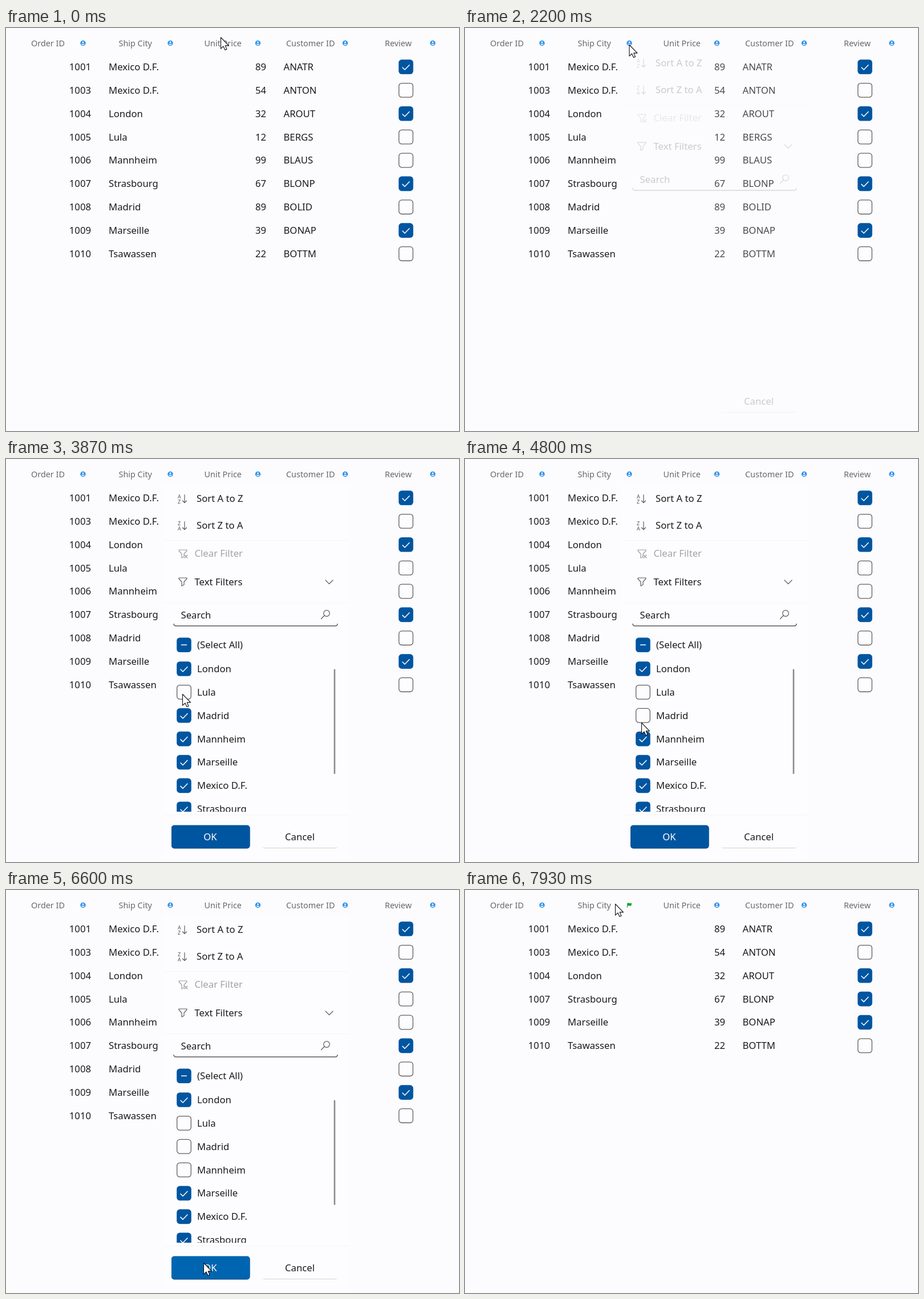
Recreate the animation shown at these times as an HTML page. Size 794 px wide and 705 px high, loop 8 s.

```html
<!DOCTYPE html>
<html lang="en">
<head>
<meta charset="utf-8">
<title>Grid filter</title>
<style>
  html, body { margin: 0; width: 100%; height: 100%; overflow: hidden; background: #fcfcff; }
  svg { display: block; font: 16.7px "Noto Sans", "Open Sans", sans-serif; fill: #1a1a1a; }
  .head { font-size: 14.4px; fill: #686868; }
  .end { text-anchor: end; }
  .mid { text-anchor: middle; }
  .dim { fill: #a2a2a2; }
  .line { fill: none; stroke: #5c5c5c; stroke-width: 1.2; stroke-linecap: round; stroke-linejoin: round; }
  .mark { fill: none; stroke: #fff; stroke-width: 1.5; stroke-linecap: round; stroke-linejoin: round; }
  .blue { fill: #0055a0; }
  .hover { fill: #0065b0; }
  .empty { fill: #fdfdff; stroke: #606060; stroke-width: 1.3; }
  .rule { stroke: #f5f5f3; }
  .sort { font-size: 9px; fill: #555; }
</style>
</head>
<body>
<svg id="stage" width="794" height="705" viewBox="0 0 794 705"></svg>
<script>
const LOOP = 8000, STEP = 200 / 3;
const OPEN = 2160, CLOSE = 6730;

const headers = [["Order ID", 44, 135], ["Ship City", 197.5, 288], ["Unit Price", 347.5, 441.5],
  ["Customer ID", 491, 594.5], ["Review", 664, 748]];

const orders = [
  [1001, "Mexico D.F.", 89, "ANATR", true],
  [1003, "Mexico D.F.", 54, "ANTON", false],
  [1004, "London", 32, "AROUT", true],
  [1005, "Lula", 12, "BERGS", false],
  [1006, "Mannheim", 99, "BLAUS", false],
  [1007, "Strasbourg", 67, "BLONP", true],
  [1008, "Madrid", 89, "BOLID", false],
  [1009, "Marseille", 39, "BONAP", true],
  [1010, "Tsawassen", 22, "BOTTM", false]
];

const cities = ["London", "Lula", "Madrid", "Mannheim", "Marseille", "Mexico D.F.", "Strasbourg"];
const uncheckedAt = { Lula: 3530, Madrid: 4330, Mannheim: 5260 };

// Pointer tip: time, x, y
const path = [
  [0, 376, 16], [67, 380, 16], [133, 368, 16], [267, 366, 14], [467, 352, 5], [867, 323, 45],
  [1130, 323, 45], [1530, 302, 37], [1800, 287.5, 29], [2270, 287.5, 29], [2900, 316, 359],
  [3070, 316, 359], [3400, 309, 411], [3870, 309, 411], [4250, 308, 452], [4670, 309, 461],
  [4800, 309, 461], [5150, 309, 490], [5670, 309, 490], [6400, 346, 652], [6800, 346, 652],
  [7400, 306, 205], [7730, 272, 4], [7930, 263, 24], [8000, 263, 24]
];

const text = (x, y, s, cls = "") => `<text x="${x}" y="${y}" class="${cls}">${s}</text>`;
const group = (x, y, body) => `<g transform="translate(${x} ${y})">${body}</g>`;
const line = (d, cls = "line") => `<path d="${d}" class="${cls}"/>`;
const clamp = v => Math.max(0, Math.min(1, v));

function checkBox(cx, cy, state, tone = "blue") {
  if (!state) return group(cx, cy, `<rect x="-12.3" y="-12.3" width="24.6" height="24.6" rx="5" class="empty"/>`);
  const mark = state === "some" ? "M-4.5 0H4.5" : "M-6 1L-2 5 6-3.3";
  return group(cx, cy, `<rect x="-12.8" y="-12.8" width="25.6" height="25.6" rx="5.5" class="${tone}"/>` + line(mark, "mark"));
}

const filterIcon = x => group(x, 26.5, `<circle r="4.7" fill="#2f92ea"/>
  <circle cy="-1.5" r="1.4" fill="#fff"/><path d="M-3 1.2H3Q2.3 3.3 0 3.3T-3 1.2Z" fill="#fff"/>`);
const flagIcon = x => group(x, 26.5,
  `<path d="M-3.8-3.4Q-1.5-4.4.5-3.6T4.3-4L3.5.7Q2 1.5 0 .9T-2.8 1.3L-3.2 4.3H-4.2Z" fill="#18a52f"/>`);

function grid(filtered) {
  const head = headers.map(([label, x, icon], i) =>
    text(x, 31.5, label, "head") + (filtered && i === 1 ? flagIcon : filterIcon)(icon)).join("");
  const rows = orders.filter(o => !filtered || !(o[1] in uncheckedAt));
  return head + rows.map(([id, city, price, customer, review], i) => {
    const cy = 68 + 40.87 * i, y = cy + 6;
    return text(149, y, id, "end") + text(180, y, city) + text(456, y, price, "end") +
      text(486.5, y, customer) + checkBox(701, cy, review);
  }).join("");
}

const sortIcon = (y, top, bottom) => text(301, y, top, "sort") + text(301, y + 9, bottom, "sort") +
  line(`M313 ${y - 6}v14m-3.5-3.5l3.5 3.5 3.5-3.5`);
const funnel = y => `M303 ${y - 6}h14v1.5l-5 5.5v5l-4 2v-7l-5-5.5z`;

const panelTop = `<rect x="276" y="43" width="326" height="657" rx="7" fill="#fdfdff"/>
  ${line("M278 142.5H600M278 251.5H600M278 622.5H600", "rule")}
  ${sortIcon(68.5, "A", "Z")}${text(334, 75, "Sort A to Z")}
  ${sortIcon(115.5, "Z", "A")}${text(334, 122, "Sort Z to A")}
  <g opacity=".6">${line(funnel(165))}${line("M313 168l5 5m0-5l-5 5")}</g>${text(330.5, 171, "Clear Filter", "dim")}
  ${line(funnel(214))}${text(330.5, 220.5, "Text Filters")}${line("M560 212l6.5 6.5 6.5-6.5")}
  ${text(306.5, 278.5, "Search")}
  <circle cx="562" cy="270" r="5.3" class="line"/>${line("M558 274l-5.5 5.5")}
  <path d="M294 288q0 4 4 4H577q4 0 4-4" fill="none" stroke="#5a5a5a" stroke-width="1.4"/>
  <clipPath id="list"><rect x="285" y="300" width="300" height="317"/></clipPath>`;

function panel(t) {
  const isOn = city => !(t >= uncheckedAt[city]);
  const touched = t >= uncheckedAt.Lula;
  const items = cities.map((city, i) => {
    const cy = 367 + 40.87 * i;
    return checkBox(312, cy, isOn(city)) + text(335, cy + 6, city);
  }).join("");
  const selectAll = checkBox(312, 325.3, touched ? "some" : true, t < 3100 ? "hover" : "blue");
  const scroll = t > 3100 ? `<rect x="574.6" y="367.5" width="2.6" height="183.5" rx="1.3" fill="#8b8b8b"/>` : "";
  // The list and the main button fade in after the rest of the panel.
  const late = clamp((t - OPEN - 60) / 100);
  return panelTop +
    `<g opacity="${late}"><g clip-path="url(#list)">${selectAll}${text(335, 331.3, "(Select All)")}${items}</g>${scroll}
     <rect x="290" y="641" width="137.5" height="40.5" rx="5" fill="#003e73"/>
     <rect x="290" y="640.5" width="137.5" height="40" rx="5" class="${t > 6330 ? "hover" : "blue"}"/>
     <g fill="#fff">${text(358, 666.5, "OK", "mid")}</g></g>
     <rect x="448" y="641" width="134.5" height="40" rx="5" fill="#d2d2d2"/>
     <rect x="447" y="639" width="136.5" height="41" rx="5" fill="#fdfdff"/>` +
    text(515, 666.5, "Cancel", "mid");
}

function pointerAt(t) {
  const i = path.findIndex(p => p[0] > t), [t0, x0, y0] = path[i - 1], [t1, x1, y1] = path[i];
  const u = (t - t0) / (t1 - t0), k = u * u * (3 - 2 * u);
  return [x0 + (x1 - x0) * k, y0 + (y1 - y0) * k];
}

const stage = document.getElementById("stage");
stage.innerHTML = `<g id="grid"></g><g id="panel"></g>
  <path id="pointer" d="M.5.5V20.2L5 16 8 22.6 11 21.2 8.2 14.9H14.5Z" fill="#fff" stroke="#111" stroke-width="1.1" stroke-linejoin="round"/>`;
const part = id => document.getElementById(id);
const layers = { grid: part("grid"), panel: part("panel") }, pointer = part("pointer");
const drawn = {};

function put(name, markup) {
  if (drawn[name] !== markup) layers[name].innerHTML = drawn[name] = markup;
}

function render(now) {
  const t = Math.floor((now % LOOP + 4) / STEP) % 120 * STEP;
  const shown = t >= OPEN && t < CLOSE + 80;
  put("grid", grid(t >= CLOSE));
  put("panel", shown ? panel(t) : "");
  const opacity = t < CLOSE ? clamp((t - OPEN) / 190) : .3;
  const slide = -10.5 * (1 - clamp((t - OPEN) / 310)) ** 2;
  layers.panel.setAttribute("opacity", opacity);
  layers.panel.setAttribute("transform", `translate(0 ${slide})`);
  pointer.setAttribute("transform", `translate(${pointerAt(t)})`);
}

const start = performance.now();
function tick() {
  render(performance.now() - start);
  requestAnimationFrame(tick);
}
tick();
</script>
</body>
</html>
```
